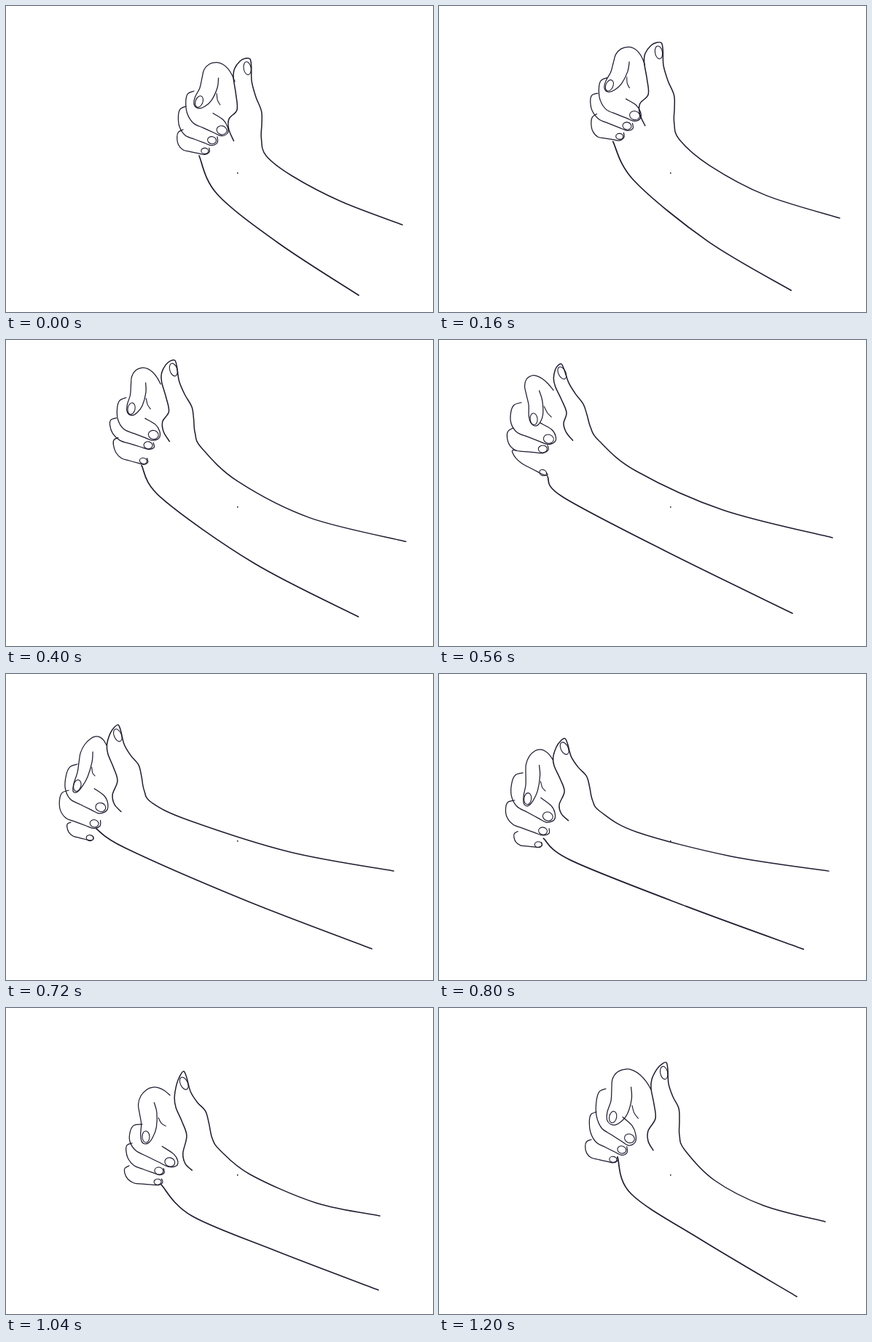
An HTML page with a canvas for the animation above (1280 ms loop, 586 by 421 pixels).

```html
<!DOCTYPE html>
<html lang="en">
<head>
<meta charset="utf-8">
<title>Waving hand</title>
<style>
html, body { margin: 0; height: 100%; overflow: hidden; background: #fff; }
canvas { display: block; }
</style>
</head>
<body>
<canvas id="stage" width="586" height="421"></canvas>
<script>
const STEP = 80, STEPS = 16;
const ctx = document.getElementById('stage').getContext('2d');

// Each outline is drawn once, as u,v pairs on the axes of three joints a, b, c:
// point = b + u (c - b) + v (a - b).
const thumbLine = [.115,1.39, -.08,1.53, -.138,1.436, 0,1, -.122,.93, -.289,.918, -.32,.8, -.232,.48, -.116,.207, 0,0,
  .078,0, .179,.098, .375,.026, .605,-.125, .694,-.043, .775,.091, 1,0];
const indexLine = [0,1, -.1,.82, -.164,.624, -.18,.423, -.138,.22, 0,0, .184,-.096, .379,-.06, .6,-.013, .84,-.05,
  1,0, 1.025,.18, .9,.361, .683,.5, .36,.53, .15,.45];
const curlLine = [0,1, -.177,.86, -.23,.6, -.184,.247, 0,0, .29,-.059, .6,-.11, .823,-.14, 1,0, .995,.2, .864,.376, .567,.488];
const creaseLine = [.48,.58, .6,.68, .66,.82];

// Joints of each part at the key steps; "arm" carries on from the thumb line to the elbow.
const poses = [
  { at: 0, thumb: [317,143, 335,73, 357,206], arm: [393,234, 460,269, 544,301], under: [265,206, 290,259, 375,327, 484,398],
    index: [314,104, 279,80, 258,135], middle: [258,117, 257,161, 304,175], ring: [247,138, 246,178, 290,188], pinky: [243,170, 243,198, 279,201] },
  { at: 4, thumb: [247,104, 262,32, 292,159], arm: [340,204, 430,251, 551,281], under: [204,171, 235,223, 355,316, 484,384],
    index: [239,63, 206,43, 186,99], middle: [190,82, 188,127, 235,138], ring: [176,107, 180,139, 228,153], pinky: [177,134, 180,166, 216,167] },
  { at: 7, thumb: [175,100, 168,33, 219,138], arm: [270,180, 390,234, 540,272], under: [149,188, 170,216, 310,290, 485,376],
    index: [157,69, 120,54, 126,114], middle: [113,86, 107,127, 159,140], ring: [102,121, 106,152, 150,151], pinky: [106,152, 114,170, 149,186] },
  { at: 9, thumb: [153,147, 154,70, 200,177], arm: [250,201, 390,245, 532,271], under: [124,213, 165,240, 330,312, 502,378],
    index: [138,98, 108,97, 92,161], middle: [98,124, 88,172, 138,188], ring: [86,160, 82,198, 129,209], pinky: [89,204, 92,223, 120,227] },
  { at: 11, thumb: [200,171, 199,101, 251,197], arm: [300,231, 410,256, 536,273], under: [171,237, 205,272, 350,326, 498,380],
    index: [183,134, 146,124, 150,190], middle: [140,145, 133,187, 186,209], ring: [129,183, 130,211, 180,223], pinky: [134,222, 139,242, 172,239] },
  { at: 13, thumb: [248,176, 244,87, 294,196], arm: [335,229, 425,268, 513,286], under: [213,243, 255,286, 370,334, 511,388],
    index: [225,120, 185,121, 187,185], middle: [187,160, 178,196, 234,217], ring: [173,186, 176,217, 217,227], pinky: [169,217, 176,241, 215,240] },
  { at: 15, thumb: [297,152, 312,75, 337,195], arm: [378,237, 446,272, 530,294], under: [245,205, 264,256, 360,319, 491,397],
    index: [291,112, 245,88, 231,155], middle: [229,111, 223,165, 269,185], ring: [216,143, 216,185, 258,199], pinky: [209,181, 209,206, 245,210] }
];

const wrapPose = k => poses[(k + poses.length) % poses.length];
const poseTime = k => wrapPose(k).at + STEPS * Math.floor(k / poses.length);

// Smooth cyclic blend of one part between the surrounding poses.
function blend(part, now) {
  const k = poses.findLastIndex(pose => pose.at <= now);
  const around = [k - 1, k, k + 1, k + 2];
  const [ta, tb, tc, td] = around.map(poseTime);
  const [a, b, c, d] = around.map(i => wrapPose(i)[part]);
  const span = tc - tb, u = (now - tb) / span, v = 1 - u;
  return b.map((p, i) => {
    const m = (c[i] - a[i]) / (tc - ta) * span;
    const n = (d[i] - p) / (td - tb) * span;
    return p * (1 + 2 * u) * v * v + m * u * v * v + c[i] * u * u * (3 - 2 * u) - n * u * u * v;
  });
}

function place(line, [ax, ay, bx, by, cx, cy]) {
  const pts = [];
  for (let i = 0; i < line.length; i += 2) {
    const u = line[i], v = line[i + 1];
    pts.push(bx + u * (cx - bx) + v * (ax - bx), by + u * (cy - by) + v * (ay - by));
  }
  return pts;
}

function curve(pts, weight) {
  const last = pts.length / 2 - 1;
  const at = (i, axis) => pts[2 * Math.max(0, Math.min(last, i)) + axis];
  const handle = (i, side, axis) => at(i, axis) + side * (at(i + 1, axis) - at(i - 1, axis)) / 6;
  ctx.lineWidth = weight;
  ctx.beginPath();
  ctx.moveTo(pts[0], pts[1]);
  for (let i = 0; i < last; i++) {
    ctx.bezierCurveTo(handle(i, 1, 0), handle(i, 1, 1), handle(i + 1, -1, 0), handle(i + 1, -1, 1), at(i + 1, 0), at(i + 1, 1));
  }
  ctx.stroke();
}

// An oval that points from joint b to joint c.
function nail(joints, u, v, length, width) {
  const [x, y] = place([u, v], joints);
  const [, , bx, by, cx, cy] = joints;
  ctx.lineWidth = 1.1;
  ctx.beginPath();
  ctx.ellipse(x, y, length, width, Math.atan2(cy - by, cx - bx), 0, 2 * Math.PI);
  ctx.stroke();
}

function draw(ms) {
  const now = Math.floor(ms / STEP) % STEPS;
  const joints = part => blend(part, now);
  ctx.fillStyle = '#fff';
  ctx.fillRect(0, 0, 586, 421);
  ctx.strokeStyle = ctx.fillStyle = '#1f1c30';
  ctx.lineCap = ctx.lineJoin = 'round';

  const thumb = joints('thumb'), index = joints('index');
  curve([...place(thumbLine, thumb), ...joints('arm')], 1.5);
  curve(joints('under'), 1.7);
  nail(thumb, -.01, .2, 9, 5);

  curve(place(indexLine, index), 1.25);
  curve(place(creaseLine, index), 1.1);
  nail(index, .88, .13, 8, 5);

  ['middle', 'ring', 'pinky'].forEach((part, i) => {
    const finger = joints(part);
    curve(place(i ? curlLine.slice(0, -4) : curlLine, finger), 1.25);
    nail(finger, .83, .04, 7 - i, 6 - i);
  });
  ctx.fillRect(317, 229, 1.6, 1.6);
}

const start = performance.now();
function tick() {
  draw(performance.now() - start);
  requestAnimationFrame(tick);
}
tick();
</script>
</body>
</html>
```
